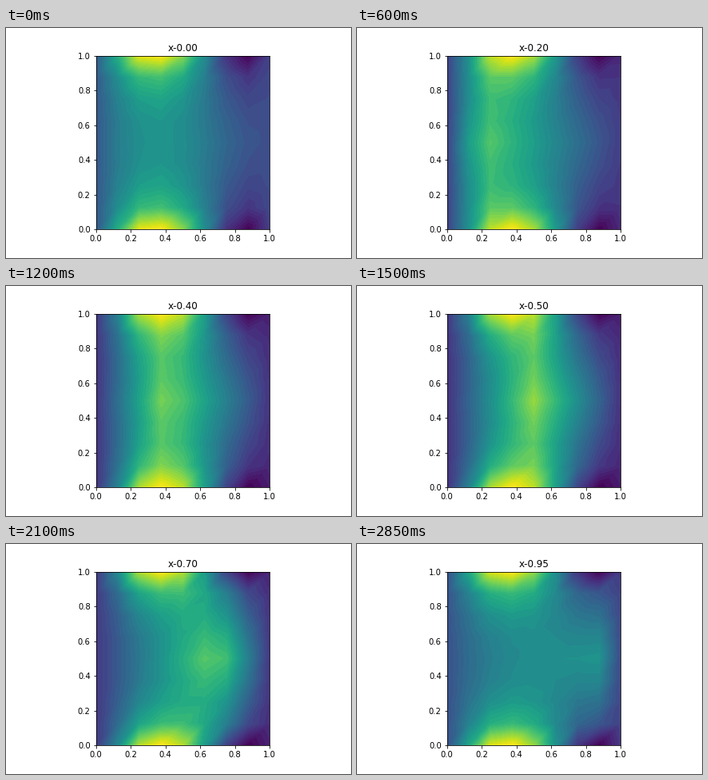
Write a matplotlib script that moves like this. It is 432 by 288 pixels and loops after 3 s.

```python
import matplotlib.pyplot as plt
import numpy as np
from matplotlib.animation import FuncAnimation
from matplotlib.tri import Triangulation

FRAMES = 20
CELLS = 8
LEVELS = np.linspace(0, 1, 41)

plt.rcParams.update({"font.family": "DejaVu Sans", "font.size": 10})

# Profile along the lower and upper sides at the ends and the middle of the sweep
SIDE_END = np.array([.27, .62, .96, 1, .82, .48, .14, 0, .18])
SIDE_MID = np.array([.14, .43, .87, 1, .90, .56, .20, 0, .07])
SWELL = np.array([0, .15, .23, .26, .23, .16, .08, .02, 0])

# Influence of the sides and of the centre line, row by row
SIDE_HALF = [1, .42, .20, .06, 0]
CORE_HALF = [0, .47, .65, .85, 1]


def mirror(half):
    return np.array(half + half[-2::-1])[:, None]


def make_mesh():
    grid = np.linspace(0, 1, CELLS + 1)
    x, y = np.meshgrid(grid, grid)
    n = CELLS + 1
    cells = []
    for row in range(CELLS):
        for col in range(CELLS):
            a = row * n + col
            cells += [(a, a + 1, a + n + 1), (a, a + n + 1, a + n)]
    return grid, Triangulation(x.ravel(), y.ravel(), cells)


grid, mesh = make_mesh()
w_side, w_core = mirror(SIDE_HALF), mirror(CORE_HALF)


def tent(u, peak):
    rise = u / max(peak, 1e-9)
    fall = (1 - u) / max(1 - peak, 1e-9)
    return np.minimum(rise, fall)


def field(t):
    arch = 4 * t * (1 - t)
    spread = np.sqrt(arch)
    side = SIDE_END + (SIDE_MID - SIDE_END) * arch
    base = (.27 - .13 * arch) * (1 - grid) + (.24 - .10 * arch) * grid
    core = base + .7 * spread * tent(grid, t) + (1 - spread) ** 1.5 * SWELL
    z = w_side * side + w_core * core + (1 - w_side - w_core) * base
    return np.clip(z, 0, 1)


fig, ax = plt.subplots(figsize=(6, 4), dpi=72, facecolor="white")
fig.subplots_adjust(left=.125, right=.9, bottom=.125, top=.88)


def draw(i):
    t = i / FRAMES
    ax.clear()
    ax.tricontourf(mesh, field(t).ravel(), levels=LEVELS, cmap="viridis",
                   vmin=0, vmax=1)
    ax.set(xlim=(0, 1), ylim=(0, 1), aspect="equal")
    ax.set_title(f"x-{t:.2f}")
    return ax.collections


anim = FuncAnimation(fig, draw, frames=FRAMES, interval=150,
                     init_func=lambda: draw(0), repeat=True, repeat_delay=0)
plt.show()
```
